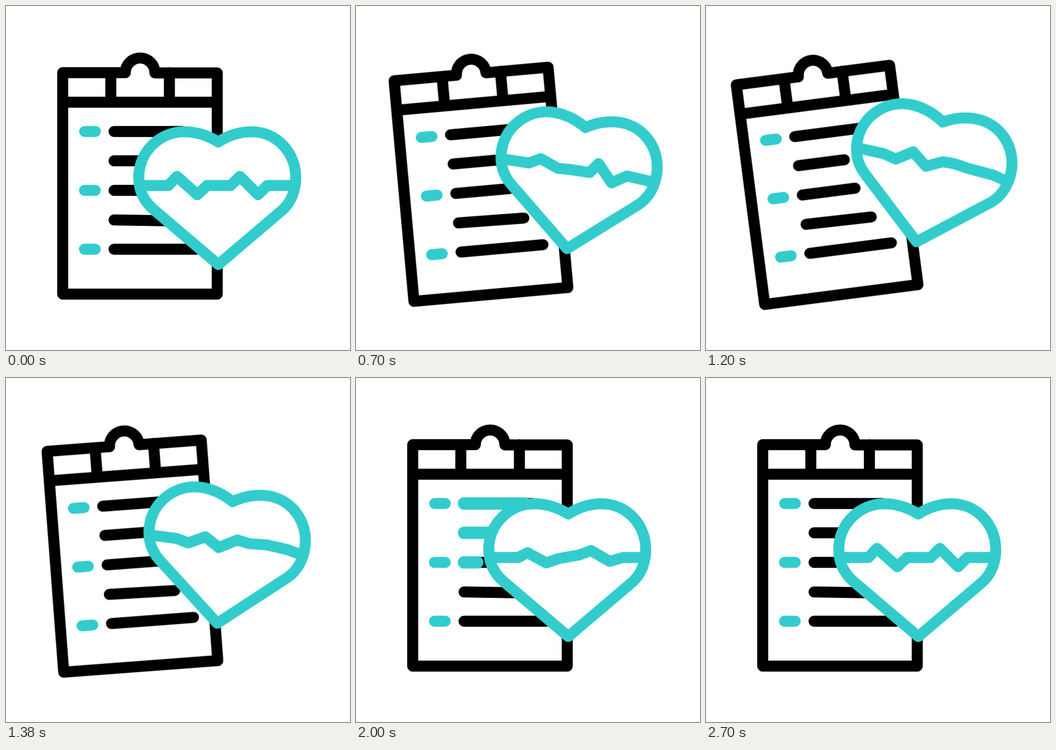
An HTML page without scripts for the animation above (3.02 s loop, 640 by 640 pixels).

```html
<!DOCTYPE html>
<html lang="en">
<head>
<meta charset="utf-8">
<title>Health report</title>
<style>
  html, body { margin: 0; width: 100%; height: 100%; overflow: hidden; background: #fff; }
  svg { display: block; width: 100%; height: 100%; }
  path { fill: none; stroke: #000; stroke-width: 20.5; stroke-linecap: round; stroke-linejoin: round; }
  .teal path { stroke: #33cccc; }
  .heart .body { fill: #fff; }

  .board, .heart { animation: 3.02s cubic-bezier(.333, 0, .667, 1) infinite; }
  .board { transform-origin: 257px 517px; animation-name: tilt; }
  .heart { transform-origin: 395px 481px; animation-name: lift; }

  @keyframes tilt {
    0%, 11.26%, 57.62%, 100% { transform: rotate(0deg); }
    33.11% { transform: rotate(-9deg); }
  }
  @keyframes lift {
    0%, 11.26%, 57.62%, 100% { transform: translate(0, 0) rotate(0deg); }
    33.11% { transform: translate(-4.2px, -51.7px) rotate(15.2deg); }
  }

  .pulse { animation: beat 3.02s linear infinite; }
  @keyframes beat {
    0%, 17.88%, 81.13%, 100% { d: path("M255 334H302L318 317L356 351L374 334L418 334L435 317L469 351L486 334L531 334"); }
    29.8% { d: path("M255 334H299L326 330L355 317L385 335L412 335L422 314L445 343L484 326L531 334"); }
    39.74% { d: path("M255 334H300L324 339L353 319L382 340L411 325L432 324L460 327L507 329L531 334"); }
    52.32% { d: path("M255 334H300L321 340L353 330L378 342L414 320L439 329.5L477.5 322L505 328L531 334"); }
    66.23% {
      d: path("M255 334H302L319 325L354 344L377 336L416 329L437 321L472 341L497 334L531 334");
      animation-timing-function: ease-out;
    }
  }

  /* coloured strokes run along the rows one after another */
  .sweep path {
    stroke-width: 23;
    stroke-dasharray: 1 2;
    stroke-dashoffset: 1.05;
    animation: sweep 3.02s linear calc(var(--i) * .12s) infinite backwards;
  }
  @keyframes sweep {
    0%, 55.5%, 73.5%, 100% { stroke-dashoffset: 1.05; }
    65.4% { stroke-dashoffset: 0; }
  }
</style>
</head>
<body>
<svg viewBox="0 0 640 640">
  <g class="board">
    <path d="M222 124H105.500V536H393V124.500H277A27.500 27.500 0 0 0 222 124M105.500 179H393M195 124V179M304 124V179"/>
    <path d="M201 233.500H328M201 288H287M201 343H300M201 398L323 400M201 452.500H354"/>
    <g class="teal">
      <path d="M146.300 233.500H166.300M146 343H166M146 452.500H166"/>
      <g class="sweep">
        <path style="--i:0" pathLength="1" d="M201 233.500H328"/>
        <path style="--i:1" pathLength="1" d="M201 288H287"/>
        <path style="--i:2" pathLength="1" d="M201 343H300"/>
        <path style="--i:3" pathLength="1" d="M201 398L323 400"/>
        <path style="--i:4" pathLength="1" d="M201 452.500H354"/>
      </g>
    </g>
  </g>
  <g class="heart teal">
    <path class="body" d="M395 481L275 379C257 364 247 343 247 319C247 272 285 234 332 234C357 234 377 242 395 253C412 242 433 234 457 234C503 234 539 272 539 319C539 342 531 364 515 379Z"/>
    <path class="pulse" d="M255 334H302L318 317L356 351L374 334L418 334L435 317L469 351L486 334L531 334"/>
  </g>
</svg>
</body>
</html>
```
